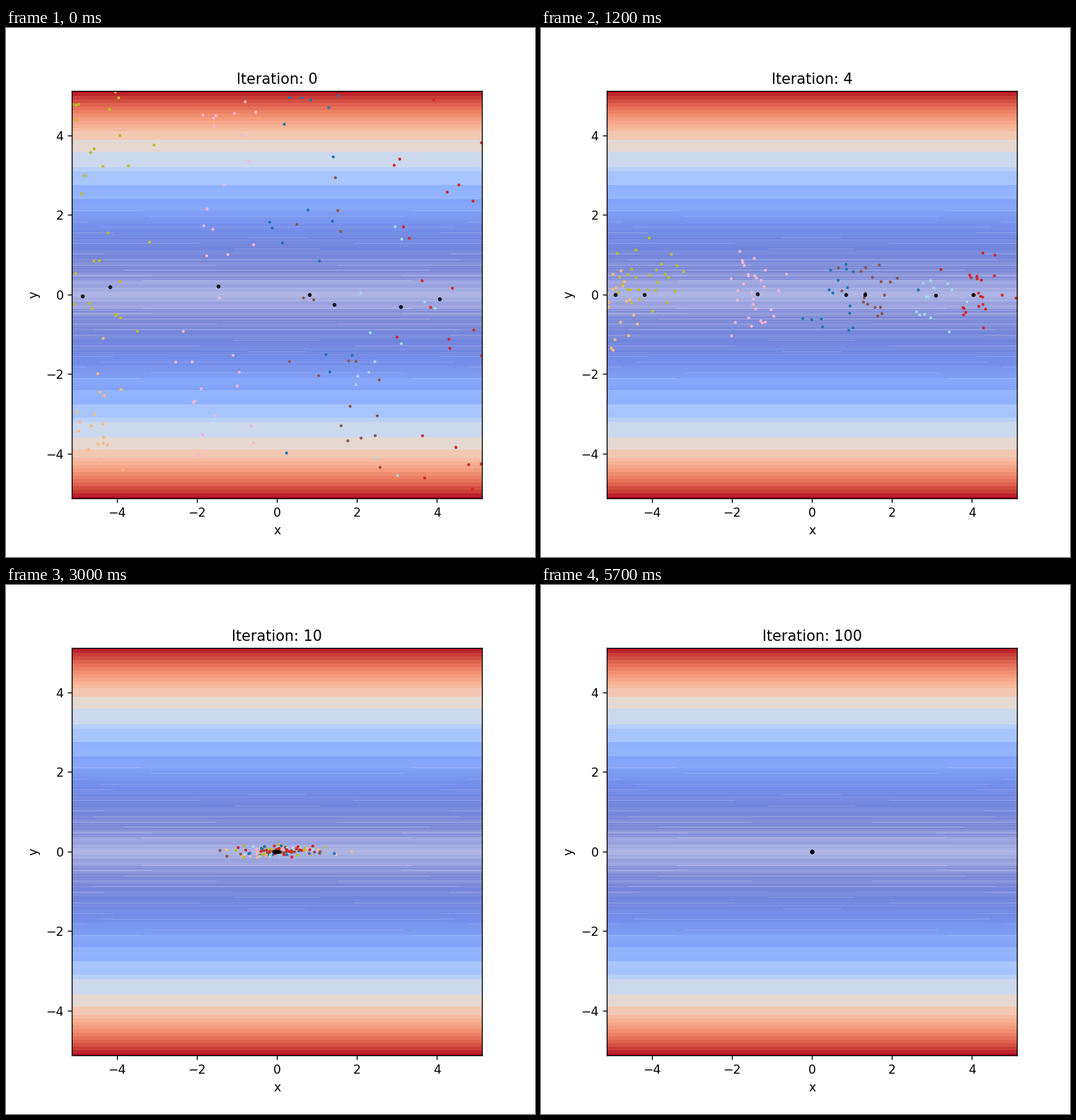
Write a matplotlib script that moves like this. It is 748 by 748 pixels and loops after 6 s.

```python
import numpy as np
import matplotlib.pyplot as plt
from matplotlib.animation import FuncAnimation

SIZE = 748
LIM = 5.12
ITERATIONS = [*range(10), *range(10, 101, 10)]

# Each cluster: tab20 colour, number of dots, starting centre x and y
CLUSTERS = [
    (3, 18, -4.87, -2.6), (16, 28, -4.18, 2.0), (13, 32, -1.47, 0.2),
    (0, 17, 0.81, 0.0), (10, 18, 1.43, -0.8), (19, 13, 3.09, -1.6),
    (6, 23, 4.07, 0.1),
]
START_X = np.array([c[2] for c in CLUSTERS])


def pull(t):
    """Share of the starting distance left: held at first, then eased to 0."""
    s = np.clip((t - 4) / 6, 0, 1)
    return 1 - s * s * (3 - 2 * s)


def fold(v):
    """Reflect values that pass the border back inside."""
    return np.clip(v - 2 * np.sign(v) * np.maximum(np.abs(v) - LIM, 0),
                   -LIM, LIM)


def bests(t):
    jitter = np.random.default_rng(t).normal(0, 0.06, 7) * (0 < t <= 10)
    y = (0.27 * np.sin(np.arange(7)) - 0.04) * np.exp(-0.8 * t)
    return np.column_stack([START_X * pull(t) + jitter, y])


def swarm(t):
    rng = np.random.default_rng(40 + t)
    reach = LIM * np.exp(-0.32 * t)
    spread = 0.3 + 0.8 * np.exp(-((t - 7.5) / 2) ** 2)
    points = []
    for _, n, cx, cy in CLUSTERS:
        if t == 0:
            x = cx + rng.uniform(-1.15, 1.15, n)
            y = cy + rng.uniform(-1, 1, n) * (LIM - abs(cy))
        elif t <= 10:
            x = cx * pull(t) + spread * rng.standard_t(5, n)
            y = (reach * np.tanh(0.4 * rng.standard_normal(n))
                 + cy * np.exp(-0.5 * t))
        else:
            x = y = np.zeros(n)
        points.append(np.column_stack([fold(x), np.clip(y, -reach, reach)]))
    return np.vstack(points)


def landscape(rows=576, cols=580):
    """Filled contours of a bent cigar, with the pale seams between levels."""
    y = LIM - (np.arange(rows) + 0.5) * 2 * LIM / rows
    x = np.linspace(-LIM, LIM, cols)
    r = np.abs(y)
    edges = np.r_[0:2.1:0.05, 2.1, 2.4, 2.75, 3.1, 3.2, 3.585, 3.89,
                  4.1:5.1:0.09, LIM + 0.01]
    k = np.searchsorted(edges, r, side="right") - 1
    mid = (edges[k] + edges[k + 1]) / 2
    rgb = plt.cm.coolwarm((mid / LIM) ** 2)[:, None, :3]

    # Seams crowd towards the valley and wash its blue out
    rng = np.random.default_rng(7)
    noise = rng.uniform(-1, 1, rows)[(r * rows / (2 * LIM)).astype(int)]
    white = 0.6 * np.exp(-r / 1.3) * np.clip((3 - r) / 0.8, 0, 1)
    white += 0.07 * noise * np.clip((2.2 - r) / 1.4, 0, 1) * (r > 0.1)
    white = np.repeat(white[:, None], cols, axis=1)

    # Level curves are so flat that they show as broken streaks
    for i, level in enumerate(np.linspace(0.34, 2.1, 14)):
        span = (np.abs(x) < rng.uniform(0.6, 4.8)) == (i % 2 == 0)
        for side in (-1, 1):
            white[np.argmin(np.abs(y - side * level)), span] += 0.12
    white = np.clip(white, 0, 1)[:, :, None]
    return rgb * (1 - white) + white


fig, ax = plt.subplots(figsize=(6, 6), dpi=SIZE / 6)
fig.subplots_adjust(left=93.45 / SIZE, right=672.84 / SIZE,
                    bottom=83.24 / SIZE, top=658.9 / SIZE)
ax.imshow(landscape(), extent=(-LIM, LIM, -LIM, LIM), aspect="auto",
          interpolation="nearest", zorder=0)
ax.set(xlim=(-LIM, LIM), ylim=(-LIM, LIM), xlabel="x", ylabel="y")
title = ax.set_title("Iteration: 0")

colors = [plt.cm.tab20.colors[c[0]] for c in CLUSTERS for _ in range(c[1])]
dots = ax.scatter(*swarm(0).T, s=2, c=colors, zorder=1.5)
marks = ax.scatter(*bests(0).T, s=5, c="black", alpha=0.8, zorder=1.6)


def update(i):
    t = ITERATIONS[i]
    title.set_text(f"Iteration: {t}")
    dots.set_offsets(swarm(t))
    marks.set_offsets(bests(t))
    return title, dots, marks


anim = FuncAnimation(fig, update, frames=len(ITERATIONS), interval=300,
                     repeat=True, repeat_delay=0)
plt.show()
```
